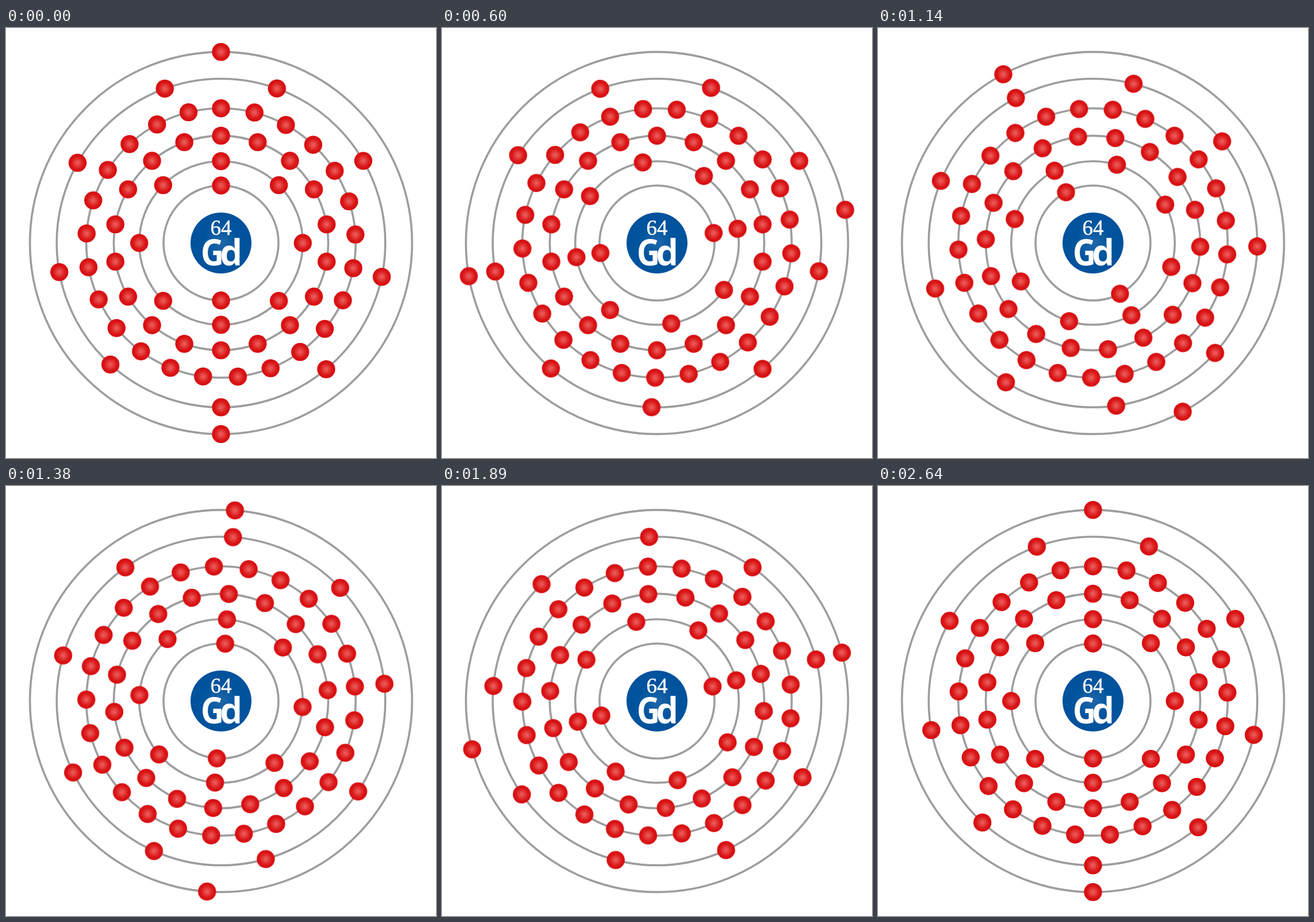
Write an HTML page that moves like this. It is 748 px wide and 748 px high and loops after 2670 ms.

```html
<!DOCTYPE html>
<html lang="en">
<head>
<meta charset="utf-8">
<title>Electron shells</title>
<style>
  html, body { margin: 0; width: 100%; height: 100%; overflow: hidden; background: #fff; }
  svg { display: block; width: 100%; height: 100%; }
  .ring { fill: none; stroke: #9e9d9d; stroke-width: 3.6; }
  #electrons { transform-origin: 374px 374px; animation: orbit 2670ms infinite; }
  .number { font: 37px "Liberation Serif", serif; stroke: #fff; stroke-width: .5; }
  .symbol { font: bold 62px "Noto Sans Mono", monospace; letter-spacing: -5px; }

  /* The second half turn takes slightly less time than the first. */
  @keyframes orbit {
    0% { transform: rotate(0deg); animation-timing-function: steps(45, jump-end); }
    50.5617% { transform: rotate(180deg); animation-timing-function: steps(44, jump-none); }
    100% { transform: rotate(360deg); }
  }
</style>
</head>
<body>
<svg viewBox="0 0 748 748">
  <defs>
    <radialGradient id="red">
      <stop offset="0" stop-color="#ec6260"/>
      <stop offset=".35" stop-color="#e33c3b"/>
      <stop offset=".7" stop-color="#d91416"/>
      <stop offset="1" stop-color="#d80d10"/>
    </radialGradient>
    <radialGradient id="blue">
      <stop offset="0" stop-color="#2067a9"/>
      <stop offset=".6" stop-color="#00539d"/>
      <stop offset="1" stop-color="#00529c"/>
    </radialGradient>
  </defs>
  <g id="rings"></g>
  <g id="electrons"></g>
  <circle cx="374" cy="374" r="53" fill="url(#blue)"/>
  <g fill="#fff" text-anchor="middle">
    <text class="number" x="374" y="359.5">64</text>
    <text class="symbol" x="372.5" y="412.5">Gd</text>
  </g>
</svg>
<script>
  const C = 374;
  const even = n => Array.from({ length: n }, (_, i) => i * 360 / n);

  // Radius of each shell and the angles of its electrons, clockwise from the top.
  const shells = [
    [100, even(2)],
    [142.3, even(8)],
    [186.6, even(18)],
    [234.3, even(25).map((a, i) => i > 12 ? a + 0.45 : a)],
    [285.8, [19.9, 60, 101.9, 140.2, 180, 222.3, 259.8, 299.2, 340]],
    [332.4, even(2)]
  ];

  function circle(parent, cx, cy, r, attrs) {
    const el = document.createElementNS("http://www.w3.org/2000/svg", "circle");
    const all = { cx, cy, r, ...attrs };
    for (const key in all) el.setAttribute(key, all[key]);
    parent.append(el);
  }

  const rings = document.getElementById("rings");
  const electrons = document.getElementById("electrons");

  for (const [radius, angles] of shells) {
    circle(rings, C, C, radius, { class: "ring" });
    for (const angle of angles) {
      const a = angle * Math.PI / 180;
      circle(electrons, C + radius * Math.sin(a), C - radius * Math.cos(a), 15.7, { fill: "url(#red)" });
    }
  }
</script>
</body>
</html>
```
